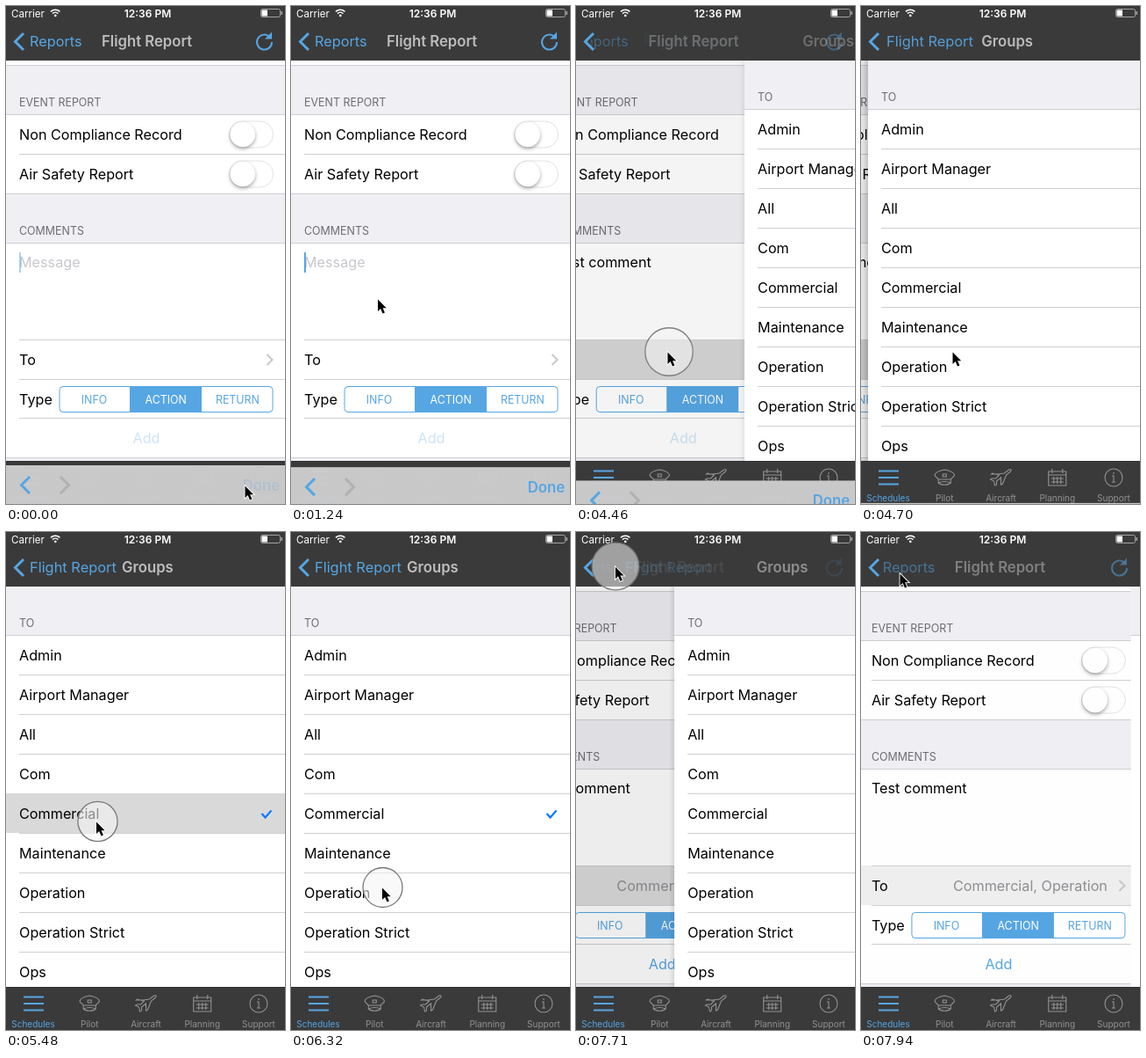
These frames come from a looping animation (318 by 566 pixels, 7.99 s). An HTML page with a canvas:

```html
<!DOCTYPE html>
<html lang="en">
<head>
<meta charset="utf-8">
<title>Flight report</title>
<style>
html, body { margin: 0; height: 100%; overflow: hidden; }
canvas { display: block; width: 318px; height: 566px; }
</style>
</head>
<body>
<canvas width="318" height="566"></canvas>
<script>
const c = document.querySelector('canvas').getContext('2d');
const W = 318, H = 566, LOOP = 7990;
const BLUE = '#56a6e4', DARK = '#3a3a3a', LINE = '#cfced3', PALE = '#efeff4';
const PUSH = 4383, POP = 7640;
const GROUPS = ['Admin', 'Airport Manager', 'All', 'Com', 'Commercial',
  'Maintenance', 'Operation', 'Operation Strict', 'Ops'];
const COMMENT = 'Test comment';
const KEYS = [1660, 1840, 2080, 2180, 2290, 2400, 2510, 2620, 2730, 2840, 2960, 3080];
// time, x, y of the pointer tip
const POINTER = [[340, 272, 545], [880, 98.5, 333], [3480, 98.5, 333], [3860, 104, 393],
  [4960, 104, 393], [5280, 102.5, 329], [5720, 102.5, 329], [6200, 103.5, 404],
  [6680, 103.5, 404], [7240, 44.5, 38], [7650, 44.5, 38], [7900, 44, 47]];
// press, release, x, y
const TAPS = [[4160, PUSH, 106, 393], [5300, 5480, 104.5, 329],
  [6320, 6500, 104.5, 404], [7420, POP, 45, 39]];

const clamp = v => Math.max(0, Math.min(1, v));
const ramp = (t, from, to) => clamp((t - from) / (to - from));
const spring = ms => { const u = Math.max(0, ms) * 0.0175; return 1 - Math.exp(-u) * (1 + u); };

function rect(x, y, w, h, color) { c.fillStyle = color; c.fillRect(x, y, w, h); }
function rule(y, x = 0) { rect(x, y, W, 1, LINE); }
function text(s, x, y, color = '#000', size = 16.2, weight = 400, align = 'left') {
  c.font = `${weight} ${size}px Inter, "Open Sans", sans-serif`;
  c.textAlign = align;
  c.fillStyle = color;
  c.fillText(s, x, y);
}
function stroke(d, color, width) {
  c.strokeStyle = color;
  c.lineWidth = width;
  c.stroke(new Path2D(d));
}
function faded(alpha, draw) {
  c.save();
  c.globalAlpha *= clamp(alpha);
  draw();
  c.restore();
}
function moved(x, y, draw) {
  c.save();
  c.translate(x, y);
  draw();
  c.restore();
}
function pill(x, y, w, h, r, fill, line) {
  c.beginPath();
  c.roundRect(x, y, w, h, r);
  if (fill) { c.fillStyle = fill; c.fill(); }
  if (line) { c.strokeStyle = line; c.lineWidth = 1; c.stroke(); }
}

function toggle(y) {
  pill(254.5, y - 15, 50, 30, 15, '#fff', '#e2e2e4');
  c.save();
  c.shadowColor = 'rgba(0,0,0,.35)';
  c.shadowBlur = 4;
  c.shadowOffsetY = 2;
  pill(255.5, y - 14.25, 28.5, 28.5, 14.25, '#fff');
  c.restore();
}

function caretAlpha(t) {
  if (t < 60) return 0.5;
  if (t >= PUSH) return 0;
  if (t > 1240 && t < 3080) return 1;
  const phase = (t - (t < 3080 ? 60 : 3080)) % 780;
  return 1 - ramp(phase, 430, 500) + ramp(phase, 720, 780);
}

function reportPage(t) {
  rect(0, 62, W, 455, '#fff');
  for (const [y, title] of [[68, 'EVENT REPORT'], [214, 'COMMENTS']]) {
    rect(0, y, W, 55, PALE);
    text(title, 15, y + 45.5, '#6d6d72', 12.45);
  }
  rect(0, 514, W, 3, PALE);
  faded(t < 4220 ? 0 : 1 - ramp(t, POP, POP + 500), () => rect(0, 379, W, 45, '#d6d6d6'));
  [67, 123, 213, 269, 513].forEach(y => rule(y));
  [168, 379, 424, 468].forEach(y => rule(y, 15));

  text('Non Compliance Record', 15, 151.5);
  text('Air Safety Report', 15, 196.5);
  toggle(146);
  toggle(191);

  const typed = COMMENT.slice(0, KEYS.filter(k => t >= k).length);
  text(typed || 'Message', 15, 297, typed ? '#000' : '#c7c7cd');
  const end = typed ? c.measureText(typed).width : 0;
  faded(caretAlpha(t), () => rect(15 + end, 280, 2, 23, BLUE));

  const chosen = t > 6500;
  text('To', 15, 407.5);
  if (chosen) text('Commercial, Operation', 284, 407.5, '#8e8e93', 16.2, 400, 'right');
  stroke('M297.5 396l6 6-6 6', '#c7c7cc', 2);

  text('Type', 15, 452.5);
  pill(61, 432.5, 243, 29, 4, '#fff', BLUE);
  rect(141, 432, 82, 30, BLUE);
  ['INFO', 'ACTION', 'RETURN'].forEach((s, i) =>
    text(s, 100.5 + i * 81.7, 451.5, i === 1 ? '#fff' : BLUE, 12.4, 400, 'center'));
  faded(chosen ? 1 : 0.3, () => text('Add', 160, 496.5, BLUE, 16.2, 400, 'center'));
}

function groupsPage(t) {
  rect(0, 62, W, 455, '#fff');
  rect(0, 62, W, 55, PALE);
  rule(117);
  text('TO', 15, 107.5, '#6d6d72', 12.45);
  GROUPS.forEach((name, i) => {
    const y = 118 + i * 45;
    const picked = { 4: 5480, 6: 6500 }[i];
    const on = t >= picked;
    if (on) faded(1 - ramp(t, picked + 80, picked + 480), () => rect(0, y - 1, W, 45, '#d9d9d9'));
    if (i < 8) rule(y + 44, 15);
    text(name, 15, y + 27.5);
    if (on) moved(297, y + 23, () => stroke('M-5.5-1l4 4.5 7-8', '#0a7aff', 2.2));
  });
}

function navBar(t, p) {
  rect(0, 0, W, 62, DARK);
  const old = t < POP ? 1 - ramp(t, PUSH, PUSH + 130) : ramp(t, POP, POP + 560);
  const pressed = t >= 7420 && t < POP ? 0.35 : 1;

  faded(pressed, () => stroke('M20 31l-9.5 9.5 9.5 9.5', BLUE, 3));
  c.save();
  c.beginPath();
  c.rect(17, 20, W, 42);
  c.clip();
  faded(old, () => text('Reports', 27 - 68 * p, 46, BLUE, 16.3));
  c.restore();
  faded(old, () => {
    text('Flight Report', 109 - 67 * p, 46, '#bdbdbd', 16.7, 600);
    stroke('M303 41A8.5 8.5 0 1 1 299.5 34.2', BLUE, 2);
    c.fillStyle = BLUE;
    c.fill(new Path2D('M303 29.5v8h-8z'));
  });
  faded(p ** 3 * pressed, () => text('Flight Report', 27 + 82 * (1 - p), 46, BLUE, 16.4));
  faded(p, () => text('Groups', 132 + 209 * (1 - p), 46, '#bdbdbd', 16.7, 600));

  text('Carrier', 6, 12.5, '#fff', 11.6);
  stroke('M51 6.4a7.4 7.4 0 0 1 10.4 0M53 8.6a4.6 4.6 0 0 1 6.4 0', '#fff', 1.5);
  pill(55, 9.6, 2.6, 2.6, 1.3, '#fff');
  text('12:36 PM', 161.5, 12.5, '#fff', 12, 600, 'center');
  pill(290.5, 3.5, 22, 9, 2, null, '#a5a5a5');
  rect(291.5, 4.5, 6.5, 7, '#fff');
  rect(313.5, 6, 1.5, 4, '#a5a5a5');
}

function tabBar() {
  rect(0, 517, W, 49, DARK);
  rect(0, 517, W, 1, '#303032');
  const grey = '#929292';
  const icons = [
    'M-11-7.5h23M-11 0h23M-11 7.5h23',
    'M-11-2C-12-6-5-8 0-9 5-8 12-6 11-2L7 2H-7zM-7 2V6C-4 9 4 9 7 6V2M-7 6Q0 3 7 6M-2-4h4v3h-4z',
    'M-11-4l7 0 8-1 5-4q4-1 2 2l-5 4-4 10-2 1 0-8-5 4 0 4-2 1-1-5-4-2 2-1 4 0 4-4-8-2z',
    'M-10-7h20V9h-20zM-10-3h20M-6-10v5M6-10v5M-7 1h14M-7 5h14M-4-1v8M0-1v8M4-1v8',
    'M10 0A10 10 0 1 1-10 0A10 10 0 1 1 10 0M-2-2h2v7M-2 5h4M0-6v2'
  ];
  ['Schedules', 'Pilot', 'Aircraft', 'Planning', 'Support'].forEach((label, i) => {
    const x = 31 + i * 64.25, color = i ? grey : BLUE;
    moved(x, 536, () => stroke(icons[i], color, i ? 1.1 : 2.2));
    text(label, x, 562.5, color, 10, 400, 'center');
  });
}

function toolbar(t) {
  let hidden = spring(t - 1221) - spring(t - 1560);
  if (t >= PUSH) hidden = spring(t - PUSH);
  moved(0, 522 + 44 * hidden, () => {
    rect(0, 0, W, 44, 'rgba(203,203,205,.98)');
    stroke('M27 13l-9.5 9.5 9.5 9.5', BLUE, 3);
    stroke('M62 13l9.5 9.5-9.5 9.5', '#b1b1b4', 3);
    faded(0.22 + 0.78 * ramp(t, 300, 480), () =>
      text('Done', 312, 28.5, BLUE, 16.7, 600, 'right'));
  });
}

function touches(t) {
  for (const [press, release, x, y] of TAPS) {
    const grow = ramp(t, release, release + 280);
    if (t < press || grow === 1) continue;
    faded(1 - grow * grow, () => {
      c.beginPath();
      c.arc(x, y, 22.5 + 17 * grow, 0, 7);
      c.fillStyle = 'rgba(245,245,245,.58)';
      c.fill();
      c.strokeStyle = '#777';
      c.lineWidth = 1.3;
      c.stroke();
    });
  }
}

function pointer(t) {
  let [, x, y] = POINTER[0];
  for (let i = 1; i < POINTER.length; i++) {
    const [t0, x0, y0] = POINTER[i - 1], [t1, x1, y1] = POINTER[i];
    if (t < t0) break;
    const u = ramp(t, t0, t1), e = u * u * (3 - 2 * u);
    x = x0 + (x1 - x0) * e;
    y = y0 + (y1 - y0) * e;
  }
  moved(x, y, () => {
    const d = 'M.5.5V14L3.6 11 6 16.4 8.4 15.4 6.1 10.2H10.2z';
    stroke(d, '#fff', 1.8);
    c.fillStyle = '#000';
    c.fill(new Path2D(d));
  });
}

function draw(t) {
  const p = t < POP ? spring(t - PUSH) : 1 - spring(t - POP);
  const edge = W * (1 - p);
  c.clearRect(0, 0, W, H);
  moved(-0.3 * W * p, 0, () => reportPage(t));
  if (p > 0) {
    rect(0, 62, edge, 455, `rgba(0,0,0,${0.11 * p})`);
    const shade = c.createLinearGradient(edge - 6, 0, edge, 0);
    shade.addColorStop(0, 'rgba(0,0,0,0)');
    shade.addColorStop(1, `rgba(0,0,0,${0.15 * p})`);
    rect(edge - 6, 62, 6, 455, shade);
    moved(edge, 0, () => groupsPage(t));
  }
  navBar(t, p);
  tabBar();
  touches(t);
  toolbar(t);
  pointer(t);
}

function frame() {
  draw(performance.now() % LOOP);
  requestAnimationFrame(frame);
}
frame();
</script>
</body>
</html>
```
